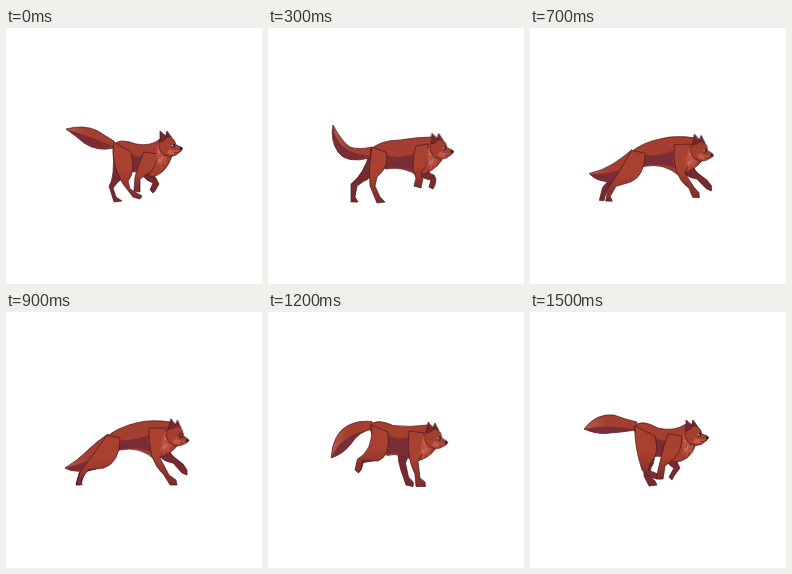
Recreate the animation shown at these times as an HTML page without scripts. Size 256 px wide and 256 px high, loop 1.6 s.

```html
<!DOCTYPE html>
<html lang="en">
<head>
<meta charset="utf-8">
<title>Running fox</title>
<style>
html, body { margin: 0; width: 100%; height: 100%; overflow: hidden; background: #fff; }
svg { display: block; width: 100%; height: 100%; }
path { stroke-linejoin: round; }
.line { stroke: #4a171d; stroke-width: .7; }
.coat { fill: #a43e2f; }
.far { fill: #76292f; }
.shade { fill: #7b2d35; }

/* One stride: poses are held in 100 ms steps */
.tail, .under, .hind-far, .fore-far, .body, .belly, .hind, .fore, .head {
  animation: 1.6s steps(2) infinite;
}
.tail { animation-name: tail; }
.under { animation-name: under; }
.hind-far { animation-name: hind-far; }
.fore-far { animation-name: fore-far; }
.body { animation-name: body; }
.belly { animation-name: belly; }
.hind { animation-name: hind; }
.fore { animation-name: fore; }
.head { animation-name: head; transform-origin: 176px 122px; }
.iris { animation: iris 1.6s step-end infinite; }
.lid { animation: lid 1.6s step-end infinite; }

@keyframes tail {
  0% { d: path("M108 113Q98 107 92 103Q78 96 60 101Q70 108 78 115Q92 124 107 120Z"); animation-timing-function: steps(3); }
  18.75% { d: path("M104 119Q90 122 82 119Q74 114 65 97Q62 112 70 124Q78 136 102 130Z"); }
  31.25% { d: path("M102 121Q94 132 84 132Q72 132 60 124Q62 136 70 142Q86 150 104 134Z"); animation-timing-function: linear(0 0% 25%, .33 25% 50%, .67 50% 100%); }
  56.25% { d: path("M102 122Q90 130 82 138Q72 148 59 156Q66 160 78 159Q100 158 108 140Z"); }
  68.75% { d: path("M102 112Q88 114 80 122Q70 132 66 154Q78 150 86 140Q94 124 106 119Z"); }
  81.25% { d: path("M106 107Q92 102 80 105Q60 110 60 138Q72 134 79 125Q88 114 104 115Z"); animation-timing-function: step-end; }
  87.5%, 100% { d: path("M107 110Q94 107 84 103Q66 101 54 117Q68 123 80 121Q94 120 106 118Z"); }
}
@keyframes under {
  0% { d: path("M60 101Q82 108 107 118Q92 124 78 115Q70 108 60 101Z"); animation-timing-function: steps(3); }
  18.75% { d: path("M65 97Q68 126 102 128Q78 136 70 124Q62 112 65 97Z"); }
  31.25% { d: path("M60 124Q74 144 103 132Q86 150 70 142Q62 136 60 124Z"); animation-timing-function: linear(0 0% 25%, .33 25% 50%, .67 50% 100%); }
  56.25% { d: path("M59 156Q84 150 106 138Q100 158 78 159Q66 160 59 156Z"); }
  68.75% { d: path("M66 154Q76 132 106 119Q94 124 86 140Q78 150 66 154Z"); }
  81.25% { d: path("M60 138Q70 112 104 114Q88 114 79 125Q72 134 60 138Z"); animation-timing-function: step-end; }
  87.5%, 100% { d: path("M54 117Q76 112 106 117Q94 120 80 121Q68 123 54 117Z"); }
}
@keyframes hind-far {
  0% { d: path("M122 130Q120 150 112 154L107 160 110 169 116 173 108 174 103 158Q109 150 107 120Z"); animation-timing-function: steps(3); }
  18.75% { d: path("M112 128Q104 152 96 153L89 158 87 169 90 174 83 174 83 156Q96 146 102 124Z"); }
  31.25% { d: path("M108 128Q100 148 90 150L78 157 73 167 74 172 68 171 72 156Q86 146 100 124Z"); animation-timing-function: linear(0 0% 25%, .33 25% 50%, .67 50% 100%); }
  56.25% { d: path("M108 130Q100 152 92 156L79 160 76 169 74 173 70 173 73 161Q84 146 100 126Z"); }
  68.75% { d: path("M112 122Q112 150 100 148L82 150 74 157 71 161 68 157 78 147Q108 140 106 118Z"); }
  81.25% { d: path("M122 128Q124 145 115 149L109 151 113 156 111 159 107 157 103 150Q112 142 108 118Z"); animation-timing-function: step-end; }
  87.5%, 100% { d: path("M124 132Q126 150 121 156L119 164 125 169 127 173 119 174 114 164Q114 150 108 120Z"); }
}
@keyframes fore-far {
  0% { d: path("M150 136Q146 148 150 150L153 156 149 163 147 165 144 162 147 155Q132 150 138 136Z"); animation-timing-function: steps(3); }
  18.75% { d: path("M160 132Q158 146 166 147L168 151 167 157 165 161 161 159 163 152Q146 150 152 132Z"); }
  31.25% { d: path("M162 130Q162 140 168 146L178 153 183 158 182 163 177 160 166 151Q146 148 152 130Z"); animation-timing-function: linear(0 0% 25%, .33 25% 50%, .67 50% 100%); }
  56.25% { d: path("M162 130Q162 140 168 145L177 152 181 158 181 163 176 161 167 151Q148 148 152 130Z"); }
  68.75% { d: path("M150 132Q146 146 146 150L151 166 156 171 156 175 149 174 143 158Q134 144 140 130Z"); }
  81.25% { d: path("M136 134Q134 146 129 152L130 164 135 170 134 174 127 172 122 156Q122 142 124 134Z"); animation-timing-function: step-end; }
  87.5%, 100% { d: path("M150 136Q146 148 147 150L150 156 144 164 142 168 139 165 144 156Q132 150 138 136Z"); }
}
@keyframes body {
  0% { d: path("M107 118Q112 109 130 116Q146 119 155 110L166 128Q160 146 146 149Q132 142 120 144Q108 136 107 118Z"); animation-timing-function: steps(3); }
  18.75% { d: path("M102 122Q112 112 132 112Q150 109 164 109L174 132Q166 144 150 148Q136 138 118 141Q104 138 102 122Z"); }
  31.25% { d: path("M100 124Q110 114 130 111Q144 107 162 109L172 132Q164 142 150 148Q134 136 116 139Q102 140 100 124Z"); animation-timing-function: linear(0 0% 25%, .33 25% 50%, .67 50% 100%); }
  56.25% { d: path("M99 126Q112 115 130 111Q144 107 165 110L173 132Q164 144 148 147Q134 134 114 138Q104 144 99 126Z"); }
  68.75% { d: path("M100 116Q106 108 122 113Q140 111 162 113L171 136Q162 146 148 148Q134 138 116 142Q104 134 100 116Z"); }
  81.25% { d: path("M103 112Q110 103 128 114Q144 120 157 113L167 134Q158 150 144 151Q132 142 122 145Q106 130 103 112Z"); animation-timing-function: step-end; }
  87.5%, 100% { d: path("M104 115Q110 106 128 116Q144 120 156 112L166 132Q160 150 144 150Q132 142 122 145Q106 136 104 115Z"); }
}
@keyframes belly {
  0% { d: path("M124 126Q134 130 140 128Q138 140 146 148Q132 142 122 144Z"); animation-timing-function: steps(3); }
  18.75% { d: path("M116 126Q130 132 146 126Q144 138 148 144Q134 138 116 140Z"); }
  31.25% { d: path("M116 124Q130 127 146 122Q142 134 146 141Q134 136 114 138Z"); animation-timing-function: linear(0 0% 25%, .33 25% 50%, .67 50% 100%); }
  56.25% { d: path("M112 128Q126 130 144 122Q140 132 146 140Q132 134 110 138Z"); }
  68.75% { d: path("M116 123Q130 129 142 124Q138 136 144 144Q132 138 116 140Z"); }
  81.25% { d: path("M120 122Q130 128 140 126Q136 138 142 149Q132 142 122 144Z"); animation-timing-function: step-end; }
  87.5%, 100% { d: path("M122 124Q132 130 140 128Q136 140 142 149Q132 142 122 144Z"); }
}
@keyframes hind {
  0% { d: path("M125 124Q130 144 122 153L124 161 136 168 134 171 127 169 117 156Q104 134 108 114Z"); animation-timing-function: steps(3); }
  18.75% { d: path("M118 124Q122 138 109 149L107 158 112 169 117 174 109 175 102 158Q100 138 104 119Z"); }
  31.25% { d: path("M118 124Q116 144 106 150L94 159 91 169 95 174 87 175 87 159Q95 146 102 121Z"); animation-timing-function: linear(0 0% 25%, .33 25% 50%, .67 50% 100%); }
  56.25% { d: path("M114 126Q114 150 98 156L82 158 75 168 76 173 70 172 74 160Q88 142 101 123Z"); }
  68.75% { d: path("M118 118Q120 148 108 152L84 149 73 160 69 163 66 158 80 146Q104 142 103 114Z"); }
  81.25% { d: path("M122 122Q126 140 112 146L105 148 113 156 112 159 108 158 99 148Q106 136 105 112Z"); animation-timing-function: step-end; }
  87.5%, 100% { d: path("M125 124Q130 142 121 150L118 158 133 164 131 167 122 166 112 158Q104 134 105 114Z"); }
}
@keyframes fore {
  0% { d: path("M152 126Q150 142 140 147L134 151 134 159 134 164 128 163 129 149Q132 136 138 124Z"); animation-timing-function: steps(3); }
  18.75% { d: path("M160 116Q163 136 153 144L155 150 154 155 153 160 146 158 148 150Q142 138 148 118Z"); }
  31.25% { d: path("M160 116Q162 134 156 142L166 152 167 158 166 163 160 162 161 155Q141 146 147 118Z"); animation-timing-function: linear(0 0% 25%, .33 25% 50%, .67 50% 100%); }
  56.25% { d: path("M160 116Q162 134 154 146L163 163 170 168 171 173 164 173 158 163Q141 148 143 116Z"); }
  68.75% { d: path("M158 118Q160 138 155 148L162 166 169 170 170 175 160 175 157 164Q141 142 142 116Z"); }
  81.25% { d: path("M154 124Q154 140 145 150L142 166 145 170 145 174 136 174 137 160Q135 148 140 122Z"); animation-timing-function: step-end; }
  87.5%, 100% { d: path("M152 124Q152 142 140 150L135 154 134 161 133 167 126 167 129 154Q132 138 138 122Z"); }
}
@keyframes head {
  0% { transform: translate(0, 0) rotate(0deg); animation-timing-function: steps(3); }
  18.75% { transform: translate(9px, 3px) rotate(2deg); }
  31.25% { transform: translate(8px, 4px) rotate(5deg); animation-timing-function: linear(0 0% 25%, .33 25% 50%, .67 50% 100%); }
  56.25% { transform: translate(6px, 8px) rotate(13deg); }
  68.75% { transform: translate(5px, 11px) rotate(12deg); }
  81.25% { transform: translate(1px, 9px) rotate(5deg); animation-timing-function: step-end; }
  87.5%, 100% { transform: translate(2px, 5px) rotate(0deg); }
}
@keyframes iris {
  0%, 87.5% { fill: #4f6f78; }
  81.25%, 93.75% { fill: #4f8a52; }
}
@keyframes lid {
  0%, 75% { opacity: 0; }
  56.25% { opacity: 1; }
}
</style>
</head>
<body>
<svg viewBox="0 0 256 256">
  <defs>
    <linearGradient id="leg" x2="0" y2="1">
      <stop offset=".5" stop-color="#a8412f"/>
      <stop offset="1" stop-color="#7c2b2e"/>
    </linearGradient>
    <linearGradient id="brush">
      <stop stop-color="#b65a55"/>
      <stop offset=".4" stop-color="#a43e2f"/>
    </linearGradient>
  </defs>
  <path class="fore-far far line"/>
  <path class="hind-far far line"/>
  <path class="tail line" fill="url(#brush)"/>
  <path class="under shade"/>
  <path class="body coat line"/>
  <path class="belly shade"/>
  <path class="hind line" fill="url(#leg)"/>
  <path class="fore line" fill="url(#leg)"/>
  <g class="head">
    <path fill="#b85043" d="M153 113Q149 122 151 131L150 138 153 135 154 141 157 134 159 137 161 129 164 128Z"/>
    <path fill="none" stroke="#dc9186" stroke-width=".8" d="M153 117l1 3M152 123l2 2M156 129l-1 4M153 131l1 3"/>
    <path class="far line" d="M159 110L161 103 166 110Z"/>
    <path class="coat line" d="M153 113Q157 107 164 109Q169 111 170 117L175 119Q177 121 175 123L170 127Q164 130 158 127Q152 122 153 113Z"/>
    <path class="far line" d="M154 114L154 103 161 109Q159 113 154 114Z"/>
    <path fill="#c25a48" d="M163 121Q169 123 174 122.500L169 126Q164 128 161 125Z"/>
    <path fill="none" stroke="#4a171d" stroke-width=".6" d="M168 124.500Q172 125 175 123"/>
    <ellipse cx="167.500" cy="117.700" rx="1.700" ry="1.900" fill="#2b1419"/>
    <circle class="iris" cx="167.200" cy="118" r="1.100"/>
    <circle cx="166.300" cy="117.200" r=".6" fill="#eee4e2"/>
    <path class="lid" fill="#a43e2f" stroke="#2b1419" stroke-width=".6" d="M165.500 115.500h4v3.500l-4-1Z"/>
    <circle cx="175.300" cy="120.700" r="1.400" fill="#241216"/>
  </g>
</svg>
</body>
</html>
```
